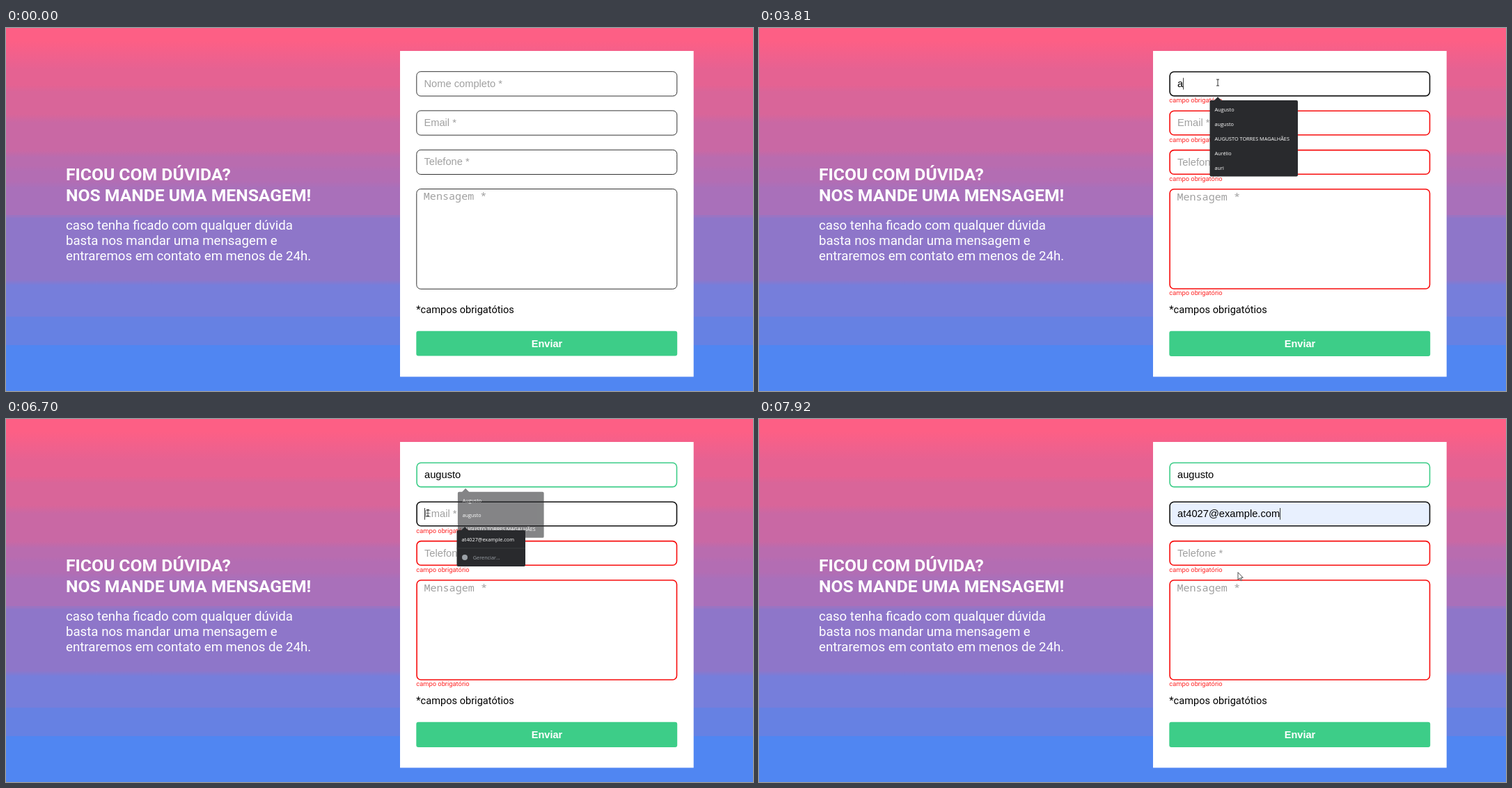
Recreate the animation shown at these times as an HTML page. Size 1073 by 522 pixels, loop 7990 ms.

```html
<!DOCTYPE html>
<html lang="pt-BR">
<head>
<meta charset="utf-8">
<title>Contato</title>
<style>
html, body { margin: 0; width: 100%; height: 100%; overflow: hidden; }
body {
  background: linear-gradient(#fd5f85 0 18px, #ea6190 52px, #e56292 60px 82px, #d96599 92px 124px,
    #c968a4 136px 176px, #b96caf 186px 198px, #b36db3 206px 220px, #a970ba 230px 269px,
    #9a74c3 269px 272px, #8e76c9 273px 362px, #767edb 370px 415px, #6681e3 415px 456px, #5086f2 456px);
}
svg { display: block; }
text { white-space: pre; }
.arial { font: 14.7px "Liberation Sans", Arial, sans-serif; }
.mono { font: 15.1px "Noto Sans Mono", monospace; }
.title { font: 700 24.7px Roboto, sans-serif; }
.lead { font: 18.67px Roboto, sans-serif; }
.note { font: 14.6px Roboto, sans-serif; }
.error { font: 9.34px Roboto, sans-serif; }
.send { font: bold 14.6px "Liberation Sans", Arial, sans-serif; }
.item { font: 7.3px "Open Sans", sans-serif; }
</style>
</head>
<body>
<svg id="stage" width="1073" height="522"></svg>
<script>
const LOOP = 7990, BLINK = 530;
const ERRORS = 1840, FOCUS_NAME = 3020, FOCUS_EMAIL = 6630, PREVIEW = 7200, FILLED = 7640;
const GREEN = '#3dcd88', GREY = '#a0a0a0', DARK = '#292a2d';
const EMAIL = 'at4027@example.com';
const NAMES = ['Augusto', 'augusto', 'AUGUSTO TORRES MAGALHÃES', 'Aurélio', 'auri'];

const typing = [[3810, 'a'], [4670, 'au'], [5000, 'augu'], [5200, 'augus'], [5400, 'august'], [5540, 'augusto']];
const caretResets = [FOCUS_NAME - 10, ...typing.map(k => k[0]), FOCUS_EMAIL, FILLED];

// Pointer moves: start, end, number of steps, points on the way
const moves = [
  [250, 1020, 12, [[1020, 293], [1041, 400], [1000, 478], [880, 496], [762, 487]]],
  [1090, 1510, 7, [[755, 483], [730, 470], [716, 458], [720.5, 452.5]]],
  [1840, 2550, 11, [[720.5, 453], [722, 470], [720, 460], [718, 445.5]]],
  [2810, 3080, 5, [[715, 420], [690, 250], [665, 110], [660, 82], [659, 78.5]]],
  [6000, 6760, 12, [[649, 80], [640, 95], [615, 128], [606, 135], [606, 135]]],
  [6830, 7570, 11, [[608, 125], [645, 66], [705, 110], [716.5, 167], [716.5, 167], [717, 169], [717, 170]]],
  [7640, 7920, 5, [[714, 174], [705, 192], [692, 215], [688, 220.5]]]
];

const pointers = {
  arrow: '<path d="M0 0V10.5L2.4 8.3L4 12L5.6 11.3L4 7.7H7.3Z" fill="#fff" stroke="#222" stroke-width=".8"/>',
  beam: '<path d="M-2-4.5H2M0-4.5V4.5M-2 4.5H2" fill="none" stroke="#222" stroke-width=".9"/>',
  hand: '<path d="M-1.3 1Q-1.3-.3 0-.3Q1.2-.3 1.2 1V4.5L4.5 5.2Q5.8 5.6 5.6 7L5 11Q4.6 13 3 13H0Q-1 13-2 11.2L-4 8Q-4.6 6.6-3.4 6.5L-1.3 8Z" fill="#fff" stroke="#222" stroke-width=".8"/>'
};

const text = (cls, x, y, str, fill, extra = '') =>
  `<text class="${cls}" x="${x}" y="${y}" fill="${fill}" ${extra}>${str}</text>`;
const box = (x, y, w, h, fill, r = 0, extra = '') =>
  `<rect x="${x}" y="${y}" width="${w}" height="${h}" rx="${r}" fill="${fill}" ${extra}/>`;

function field(y, h, state, fill = '#fff') {
  const color = { plain: '#333', error: '#f80d0d', focus: '#111', valid: GREEN }[state];
  const w = state === 'plain' ? 1 : 1.6, d = w / 2;
  return box(589.3 + d, y + d, 375 - w, h - w, fill, 6, `stroke="${color}" stroke-width="${w}"`);
}

function popup(y, w, h, content, fade = 0) {
  const cx = 647.5 + w / 2, cy = y + h / 2, s = 1 - 0.04 * fade;
  return `<g opacity="${1 - fade ** 1.4}" transform="translate(${cx} ${cy}) scale(${s}) translate(${-cx} ${-cy})">
    <path d="M653.5 ${y + 0.5}L659 ${y - 5}L664.5 ${y + 0.5}Z" fill="${DARK}"/>
    ${box(647.5, y, w, h, DARK, 2)}${content}</g>`;
}

function namePopup(rows, fade) {
  const items = NAMES.slice(0, rows).map((n, i) => text('item', 654.5, 119.6 + 21.1 * i, n, '#fff'));
  return popup(104, 126.5, 4.6 + 21 * rows, items.join(''), fade);
}

function emailPopup(hover, fade) {
  return popup(160, 98.5, 52, (hover ? box(647.5, 160, 98.5, 25.5, '#3f4043', 2) : '') +
    box(647.5, 185.5, 98.5, 0.8, '#3c4043') +
    text('item', 654.5, 175.7, EMAIL, '#fff') +
    '<circle cx="659" cy="199" r="4" fill="#9aa0a6"/>' +
    text('item', 670.8, 201.8, 'Gerenciar...', '#9aa0a6'), fade);
}

function pointer(t) {
  const move = moves.filter(m => t >= m[0]).pop();
  if (!move) return '';
  const [start, end, steps, pts] = move;
  const k = Math.floor((t - start) / (end - start) * (steps - 1) + 1e-6);
  const u = Math.min(1, k / (steps - 1)) * (pts.length - 1);
  const i = Math.min(pts.length - 2, Math.floor(u));
  const [x, y] = pts[i].map((a, j) => a + (pts[i + 1][j] - a) * (u - i));
  const inside = (top, bottom) => x > 589 && x < 964 && y > top && y < bottom;
  const overPopup = t >= FOCUS_EMAIL && x > 647 && y > 155;
  const kind = inside(436, 472) ? 'hand'
    : !overPopup && (inside(62, 98) || inside(118, 154) || inside(175, 211) || inside(231, 376)) ? 'beam' : 'arrow';
  return `<g transform="translate(${x} ${y})">${pointers[kind]}</g>`;
}

function draw(t) {
  const failed = t >= ERRORS, onName = t >= FOCUS_NAME && t < FOCUS_EMAIL, onEmail = t >= FOCUS_EMAIL;
  const filled = t >= FILLED, preview = t >= PREVIEW && !filled;
  const name = (typing.filter(k => t >= k[0]).pop() || [0, ''])[1];
  const base = failed ? 'error' : 'plain';
  const tx = failed ? 601 : 600.4, dy = failed ? 0.6 : 0;
  const fadeFrom = start => Math.max(0, Math.min(1, (t - start) / 130));

  let s = text('title', 86, 218.5, 'FICOU COM DÚVIDA?', '#fff') +
    text('title', 86, 248.5, 'NOS MANDE UMA MENSAGEM!', '#fff') +
    ['caso tenha ficado com qualquer dúvida', 'basta nos mandar uma mensagem e',
      'entraremos em contato em menos de 24h.']
      .map((line, i) => text('lead', 86, 290 + 22.2 * i, line, '#fff')).join('') +
    box(566, 33, 421.7, 468.5, '#fff');

  s += field(62.2, 36.2, onEmail ? 'valid' : onName ? 'focus' : base) +
    field(118.4, 36.2, onEmail ? 'focus' : base, preview || filled ? '#e8f0fe' : '#fff') +
    field(174.8, 36.2, base) + field(231, 144.8, base);

  s += name ? text('arial', 601, 85, name, '#000') : text('arial', tx, 85, 'Nome completo *', GREY);
  s += filled ? text('arial', 601, 141.3, EMAIL, '#000')
    : preview ? text('item', 601, 141, EMAIL, '#000', 'style="font-size:7.5px"')
    : text('arial', tx, 141 + dy / 2, 'Email *', GREY);
  s += text('arial', tx, 197.4 + dy, 'Telefone *', GREY) + text('mono', tx - 0.6, 247 + dy, 'Mensagem *', GREY);

  if (failed) {
    const shown = [!onEmail, !filled, true, true];
    [107.4, 163.6, 219.8, 384.3].forEach((y, i) => {
      if (shown[i]) s += text('error', 589.3, y, 'campo obrigatório', '#f22');
    });
  }
  s += text('note', 589.3, 410, '*campos obrigatótios', '#000') +
    box(589.3, 435.8, 374.9, failed ? 36.2 : 35.8, GREEN, 3) +
    text('send', 777, 459, 'Enviar', '#fff', 'text-anchor="middle"');

  const reset = caretResets.filter(r => t >= r).pop();
  if ((onName || onEmail) && !preview && Math.floor((t - reset) / BLINK) % 2 === 0) {
    const value = onName ? name : filled ? EMAIL : '';
    s += box(601 + textWidth(value), onName ? 71.7 : 128, 0.9, 16.8, '#222');
  }

  if (name && fadeFrom(FOCUS_EMAIL) < 1) s += namePopup(name.length < 3 ? 5 : 3, fadeFrom(FOCUS_EMAIL));
  if (onEmail && fadeFrom(FILLED) < 1) s += emailPopup(t >= PREVIEW, fadeFrom(FILLED));
  return s + pointer(t);
}

const ruler = document.createElement('canvas').getContext('2d');
ruler.font = '14.7px "Liberation Sans", Arial, sans-serif';
const textWidth = str => ruler.measureText(str).width;

const stage = document.getElementById('stage');
let last = '';
function tick() {
  const next = draw(performance.now() % LOOP);
  if (next !== last) stage.innerHTML = last = next;
  requestAnimationFrame(tick);
}
tick();
</script>
</body>
</html>
```
